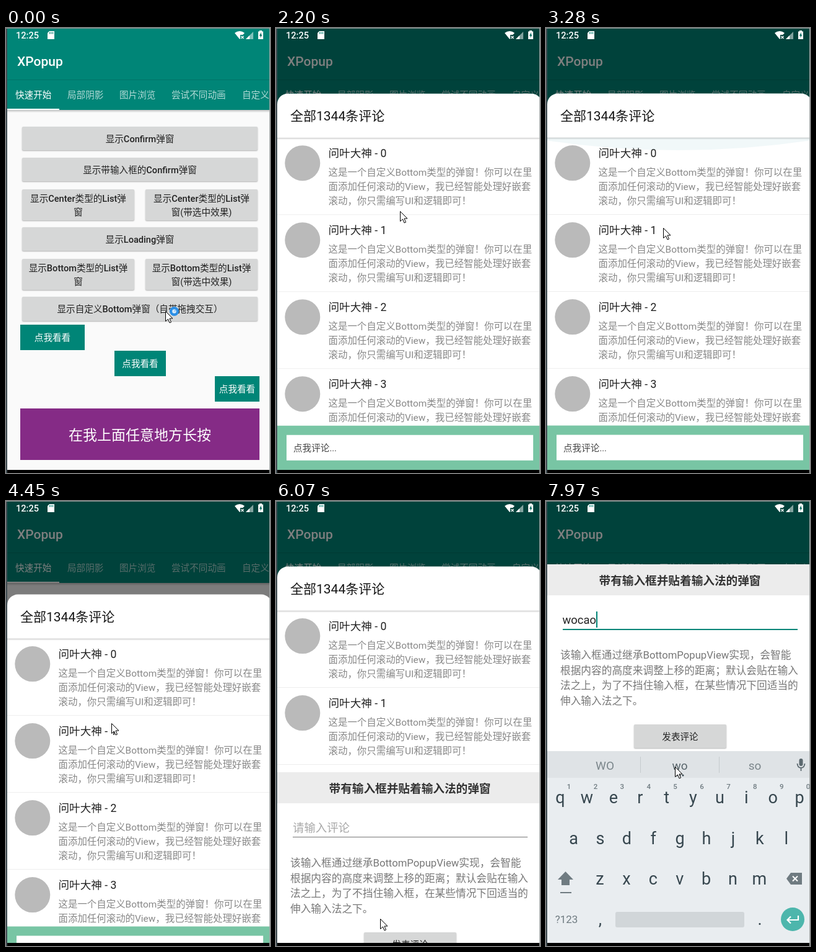
Animation of 426x717 px, one loop 8 s. Source, as an HTML page with a canvas:

```html
<!DOCTYPE html>
<html lang="zh-CN">
<head>
<meta charset="utf-8">
<title>XPopup</title>
<style>
html, body { margin: 0; width: 100%; height: 100%; overflow: hidden; background: #000; }
canvas { display: block; }
</style>
</head>
<body>
<canvas id="stage" width="426" height="717"></canvas>
<script>
const c = document.getElementById('stage').getContext('2d');
const LOOP = 8000, TEAL = '#008577', BOTTOM = 712, PANEL_TOP = 105.6;

function rect(x, y, w, h, fill, r = 0) {
  c.fillStyle = fill;
  c.beginPath();
  c.roundRect(x, y, w, h, r);
  c.fill();
}
function disc(x, y, r, fill) {
  c.fillStyle = fill;
  c.beginPath();
  c.arc(x, y, r, 0, 7);
  c.fill();
}
function setFont(size, weight) {
  c.font = `${weight} ${size}px Roboto, "Noto Sans CJK SC", "Noto Sans CJK", sans-serif`;
}
function text(s, x, y, size, fill, align = 'left', weight = 400) {
  setFont(size, weight);
  c.fillStyle = fill;
  c.textAlign = align;
  c.fillText(s, x, y);
  return c.measureText(s).width;
}
// Centred label: medium Latin letters among regular Chinese ones.
function label(s, x, y, size, fill) {
  const runs = s.match(/[A-Za-z]+|[^A-Za-z]+/g).map(run => {
    const weight = /[A-Za-z]/.test(run) ? 500 : 400;
    setFont(size, weight);
    return { run, weight, width: c.measureText(run).width };
  });
  x -= runs.reduce((sum, r) => sum + r.width, 0) / 2;
  for (const r of runs) x += text(r.run, x, y, size, fill, 'left', r.weight);
}
function shape(d, fill, stroke, width = 1) {
  const p = new Path2D(d);
  if (fill) { c.fillStyle = fill; c.fill(p); }
  if (stroke) { c.strokeStyle = stroke; c.lineWidth = width; c.stroke(p); }
}
// Linear interpolation through [time, ...values] keys.
function track(keys, t) {
  const i = keys.findIndex(k => k[0] > t);
  if (i < 0) return keys.at(-1).slice(1);
  if (!i) return keys[0].slice(1);
  const a = keys[i - 1], b = keys[i], f = (t - a[0]) / (b[0] - a[0]);
  return a.slice(1).map((v, j) => v + (b[j + 1] - v) * f);
}
const decay = (from, t, start) => from * Math.exp((start - t) / 90);

const POINTER = [
  [0, 257, 456], [89, 257, 456], [90, 257, 452], [1660, 257, 452], [2110, 200, 295],
  [2200, 200, 295], [2380, 196, 200], [2560, 192, 205], [2830, 184, 560], [3010, 183, 579],
  [3280, 189, 322], [3730, 178, 313], [3820, 178, 313], [4360, 171, 343], [4630, 167, 388],
  [4900, 163, 457], [5080, 163, 461], [5710, 168, 673], [6160, 168, 673], [6430, 176, 704],
  [6610, 180, 690], [6970, 208, 428]
];
const DRAG = [[3820, 0], [4360, 30], [4630, 75], [4900, 144], [4990, 144], [5080, 59], [5170, 22], [5260, 8], [5350, 0]];
const SCROLL = [[2200, 0], [2290, 50], [2470, 220], [2560, 240], [2650, 195], [2830, 35], [2920, 0]];
const GLOW = [[2920, 0], [3100, 1.2], [3280, 1], [3730, 0]];

function button(x, y, w, h, lines, press = 0) {
  c.save();
  c.shadowColor = `rgba(0,0,0,${0.3 + press * 0.1})`;
  c.shadowBlur = 2 + press * 2;
  c.shadowOffsetY = 1;
  rect(x, y, w, h, ['#d6d7d7', '#cbcccc', '#c0c1c1'][press], 2);
  c.restore();
  const first = y + h / 2 + 5.5 - (lines.length - 1) * 11;
  lines.forEach((s, i) => label(s, x + w / 2, first + i * 22, 14.6, '#222'));
}

function page(press) {
  rect(0, 0, 426, BOTTOM, '#fafafa');
  for (let i = 0; i < 4; i++) rect(0, 132 + i, 426, 1, `rgba(0,0,0,${0.2 - i * 0.05})`);
  rect(0, 0, 426, 132, TEAL);
  rect(0, 83, 426, 1, 'rgba(0,0,0,.13)');
  text('XPopup', 18, 61, 21, '#fff', 'left', 500);
  [['快速开始', 15], ['局部阴影', 99], ['图片浏览', 183], ['尝试不同动画', 267], ['自定义', 381]]
    .forEach(([s, x], i) => text(s, x, 112.5, 14.6, i ? 'rgba(255,255,255,.7)' : '#fff'));
  rect(2, 130, 84, 2, '#fff');

  button(26, 159, 380, 38, ['显示Confirm弹窗']);
  button(26, 209, 380, 38, ['显示带输入框的Confirm弹窗']);
  button(26, 321, 380, 38, ['显示Loading弹窗']);
  [['Center', 260], ['Bottom', 372]].forEach(([kind, y]) => {
    button(26, y, 181, 50, [`显示${kind}类型的List弹`, '窗']);
    button(225, y, 181, 50, [`显示${kind}类型的List弹`, '窗(带选中效果)']);
  });
  button(26, 433, 380, 39, ['显示自定义Bottom弹窗（自带拖拽交互）'], press);

  [[23, 478, 104], [175, 520, 83], [337, 561, 72]].forEach(([x, y, w]) => {
    rect(x, y, w, 41, TEAL);
    text('点我看看', x + w / 2, y + 26, 14.6, '#fff', 'center');
  });
  rect(23, 613, 386, 83, '#852b86');
  text('在我上面任意地方长按', 216, 664, 23, '#fff', 'center');
}

function statusIcons() {
  text('12:25', 16, 17, 14.6, '#fff', 'left', 500);
  shape('M70 5H78V18H67V8Z', '#fff');
  for (const x of [70, 72.5, 75]) rect(x, 6.5, 1.2, 3, TEAL);
  shape('M369 8Q377 2 385 8L382 11H378V17L377 18Z', '#fff');
  shape('M379.5 13L383.5 17M383.5 13L379.5 17', null, '#fff', 1.4);
  shape('M399 6V18H387Z', 'rgba(255,255,255,.5)');
  shape('M393 12V18H387Z', '#fff');
  shape('M409 4H413V5.5H415V18H407V5.5H409Z', '#fff');
  shape('M411.7 7L408.8 12.5H410.6V16L413.3 10.8H411.7Z', '#00695e');
}

function row(i, y) {
  disc(42.8, y + 40, 28.5, '#bababa');
  text('问叶大神 - ' + i, 84.5, y + 30.5, 17.6, '#212121');
  ['这是一个自定义Bottom类型的弹窗！你可以在里',
   '面添加任何滚动的View，我已经智能处理好嵌套',
   '滚动，你只需编写UI和逻辑即可！']
    .forEach((s, j) => text(s, 84.5, y + 60.8 + j * 22.6, 15.45, '#888'));
  rect(0, y + 122.5, 426, 1, '#eee');
}

function panel(top, scroll, glow) {
  const shown = (BOTTOM - top) / (BOTTOM - PANEL_TOP);
  rect(0, 1, 426, BOTTOM - 1, `rgba(0,0,0,${Math.min(0.5, 0.55 * shown)})`);
  rect(2, top, 427, 800, '#fff', [17, 17, 0, 0]);
  c.save();
  c.beginPath();
  c.rect(0, top + 71, 426, 464);
  c.clip();
  for (let i = 0; i < 8; i++) row(i, top + 72 + i * 124 - scroll);
  if (glow > 0) {
    const y = top + 71, edge = y + 5 * glow;
    shape(`M2 ${y}V${edge}Q213 ${edge + 31 * glow} 425 ${edge}V${y}Z`, `rgba(0,133,140,${0.055 * Math.min(1, glow)})`);
  }
  c.restore();
  [0.17, 0.12, 0.05].forEach((a, i) => rect(2, top + 71 + i, 424, 1, `rgba(0,0,0,${a})`));
  text('全部1344条评论', 23, top + 43.7, 21, '#151515');
  rect(2, top + 535, 424, 300, '#78c5a4');
  rect(17, top + 550, 398, 41, '#fff');
  text('点我评论...', 28, top + 576, 14.6, '#444');
}

function dialog(top, typed, focus, caret) {
  rect(2, top, 424, 301, '#fff');
  rect(2, top, 424, 50, '#ececec');
  text('带有输入框并贴着输入法的弹窗', 216, top + 33, 18.65, '#333', 'center', 700);
  if (!typed) text('请输入评论', 27, top + 96, 18.4, '#a8a8a8');
  const w = typed ? text(typed, 26.5, top + 96, 18.4, '#222') : 0;
  rect(27, top + 104, 379, focus ? 2 : 1, focus ? TEAL : '#777');
  if (caret) rect(Math.round(27 + w), top + 76, 2, 26, TEAL);
  ['该输入框通过继承BottomPopupView实现，会智能',
   '根据内容的高度来调整上移的距离；默认会贴在输入',
   '法之上，为了不挡住输入框，在某些情况下回适当的',
   '伸入输入法之下。']
    .forEach((s, i) => text(s, 23, top + 152 + i * 24.7, 16.7, '#777'));
  button(142, top + 258, 149, 38, ['发表评论']);
}

function keyboard(shift, typed) {
  const ink = '#37474f', soft = '#6f7b81';
  c.save();
  c.translate(0, shift);
  rect(2, 403, 424, 310, '#e9edf0');
  rect(2, 403, 424, 43, '#dfe3e6');
  if (typed) {
    const hints = typed.length < 2 ? ['W', 'w', 'was'] : ['WO', 'wo', 'so'];
    hints.forEach((s, i) => text(s, 95 + i * 121, 433, 19, i == 1 ? '#59666c' : '#7b868b', 'center'));
    rect(152, 412, 1, 26, '#c5cbce');
    rect(279, 412, 1, 26, '#c5cbce');
    for (const x of [211, 216, 221]) disc(x, 442, 1.5, ink);
  }
  rect(408.5, 415, 6, 12, '#5c696f', 3);
  shape('M405.5 423Q406 430 411.5 430T417.5 423M411.5 430V435', null, '#5c696f', 1.8);

  [['qwertyuiop', 23, 487], ['asdfghjkl', 44.5, 552.5], ['zxcvbnm', 87, 617.5]].forEach(([keys, x, y], r) => {
    [...keys].forEach((k, i) => {
      text(k, x + i * 42.9, y, 27, ink, 'center');
      if (!r) text((i + 1) % 10, 37 + i * 42.9, 464, 11.5, soft, 'center', 500);
    });
  });
  shape('M31.5 597L44 610H38V619H25V610H19Z', soft);
  rect(23, 630, 18, 2, soft);
  shape('M395 599H413V618H395L388 608.5Z', soft);
  shape('M398 604.5L406 612.5M406 604.5L398 612.5', null, '#fff', 2);
  text('?123', 33, 680, 17, soft, 'center');
  text(',', 87.5, 683, 27, ink, 'center');
  rect(112, 662, 208, 25, '#d1d6d9', 3);
  text('.', 345, 683, 27, ink, 'center');
  disc(398, 674, 19, '#4db6ac');
  shape('M407 668V675H390M395 669.5L389.5 675L395 680.5', null, '#fff', 2.2);
  c.restore();
}

function pointer(x, y, busy) {
  c.save();
  c.translate(Math.round(x) + 0.5, Math.round(y) + 0.5);
  shape('M0 0V16L4 12.5L6.5 18.5L9 17.5L6.5 11.5H11.5Z', '#fff', '#000');
  if (busy) {
    disc(14, 0, 7.5, '#2b8fe6');
    disc(14, 0, 3.3, '#d8eafa');
    shape('M14 0L17 -2', null, '#8cc0f0', 2);
  }
  c.restore();
}

function draw(now) {
  const raw = now % LOOP;
  // Motion is sampled every 90 ms.
  const base = raw < 650 ? 0 : raw < 1390 ? 650 : raw < 7340 ? 1390 : 7340;
  const t = base + Math.floor((raw - base) / 90) * 90;

  c.save();
  c.beginPath();
  c.rect(0, 0, 426, BOTTOM);
  c.clip();
  page(t < 650 ? 0 : t < 740 ? 1 : 2);
  if (t >= 1390) {
    const top = PANEL_TOP + decay(218.4, t, 1390) + track(DRAG, t)[0];
    panel(top, Math.round(track(SCROLL, t)[0]), track(GLOW, t)[0]);
  }
  statusIcons();
  if (t >= 5890) {
    const k = Math.min(1, Math.max(0, (t - 6610) / 360));
    const rise = Math.round(309 * (1 - (1 - k) ** 2));
    const typed = 'wocao'.slice(0, Math.max(0, Math.floor((t - 7520) / 90) + 1));
    const caret = t >= 7520 || (t >= 6840 && t < 7340);
    dialog(Math.round(411 + decay(26, t, 6070)) - rise, typed, t >= 6300, caret);
    if (rise) keyboard(309 - rise, typed);
  }
  c.restore();

  rect(0, BOTTOM, 426, 5, '#000');
  rect(0, 0, 2, 717, '#414d53');
  rect(0, 0, 426, 1, '#8c9694');
  rect(425, 0, 1, 717, '#a5aaaa');
  pointer(...track(POINTER, t), t < 1480);
}

function frame() {
  draw(performance.now());
  requestAnimationFrame(frame);
}
frame();
</script>
</body>
</html>
```
